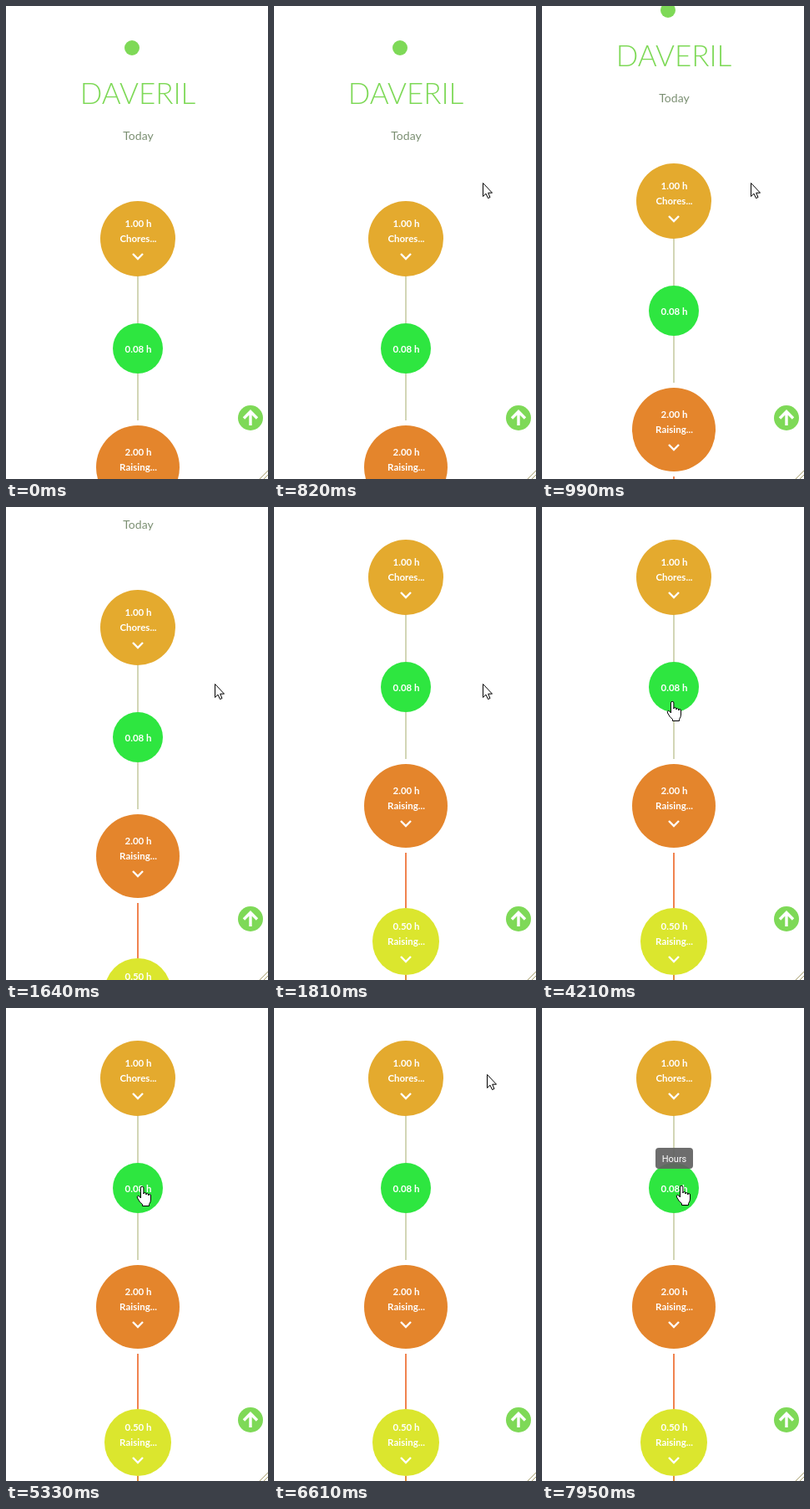
These frames come from a looping animation (314 by 565 pixels, 8 s). An HTML page:

```html
<!DOCTYPE html>
<html lang="en">
<head>
<meta charset="utf-8">
<title>Timeline</title>
<style>
  html, body { margin: 0; width: 100%; height: 100%; overflow: hidden; background: #fff; }
  svg { display: block; }
  text { font-family: Lato, sans-serif; text-anchor: middle; }
  .node text { font-size: 11.5px; font-weight: 700; fill: #fff; }
  .node path, #up path { fill: none; stroke: #fff; }
  .cursor { fill: #fff; stroke: #000; stroke-linejoin: round; }
</style>
</head>
<body>
<svg width="314" height="565" viewBox="0 0 314 565">
  <g id="page">
    <circle cx="151" cy="50" r="9" fill="#7ed957"/>
    <text x="158" y="117" font-size="35" font-weight="300" fill="#7ed957">DAVERIL</text>
    <text x="158.5" y="160" font-size="14" fill="#7b8f72">Today</text>
    <g id="links" stroke-width="2"></g>
    <g id="nodes"></g>
  </g>
  <g id="up">
    <circle cx="293" cy="492" r="15" fill="#7ed957"/>
    <path d="M293 501V485M285 492.5L293 484.5L301 492.5" stroke-width="3.4"/>
  </g>
  <path d="M304 565L314 555M309 565L314 560" stroke="#a8a070"/>
  <g id="tip">
    <rect x="136" y="167" width="45" height="25" rx="4" fill="#616161" opacity=".92"/>
    <text x="158.5" y="184" font-size="11" fill="#fff" style="font-family: Roboto, sans-serif">Hours</text>
  </g>
  <path id="arrow" class="cursor" d="M.5 .5V16.5L4 13.2L6.5 18.6L9 17.5L6.7 12.2H11.5Z"/>
  <path id="hand" class="cursor" d="M-1.5 2a1.7 1.7 0 0 1 3.4 0V9a1.5 1.5 0 0 1 3 0v1a1.4 1.4 0 0 1 2.8 0v1a1.4 1.4 0 0 1 2.8 0V16q0 3-2 5.5V23.5H.5V21.5Q-2.5 20-5.5 14Q-6.5 11.6-4.5 11.4Q-3 11.6-1.5 14Z"/>
</svg>
<script>
const LOOP = 8000;
const $ = id => document.getElementById(id);

// centre y, radius, colour, hours, label
const nodes = [
  [278, 45, '#e4aa2e', '1.00 h', 'Chores...'],
  [409, 30, '#2ee640', '0.08 h'],
  [551, 50, '#e4852c', '2.00 h', 'Raising...'],
  [713, 40, '#dbe62e', '0.50 h', 'Raising...']
];
// top, bottom, colour
const links = [
  [323, 379, '#d2d6b6'], [439, 495, '#d2d6b6'],
  [607, 673, '#f08350'], [753, 800, '#e0913f']
];

$('links').innerHTML = links.map(([a, b, c]) =>
  `<path d="M158 ${a}V${b}" stroke="${c}"/>`).join('');

$('nodes').innerHTML = nodes.map(([y, r, color, hours, label]) =>
  `<g class="node" transform="translate(158 ${y})"><circle r="${r}" fill="${color}"/>` +
  (label
    ? `<text x=".5" y="-14">${hours}</text><text x=".5" y="4">${label}</text>
       <path d="M-6 18L0 24L6 18" stroke-width="2.4"/>`
    : `<text x=".5" y="5">${hours}</text>`) + '</g>').join('');

// Pointer tip: time, x, y
const path = [
  [0, 285, 600], [110, 285, 600], [310, 250, 211], [2120, 250, 211],
  [2550, 156, 233], [4160, 156, 233], [4460, 156, 224], [4620, 156, 224],
  [4840, 163, 213], [5330, 163, 213], [5700, 314, -25], [6609, 314, -25],
  [6610, 255, 79], [7160, 167, 212], [LOOP, 167, 212]
];

function ease(t, from, to) {
  const p = Math.min(1, Math.max(0, (t - from) / (to - from)));
  return p * p * (3 - 2 * p);
}

function pointer(t) {
  const i = path.findIndex(k => k[0] > t);
  const [t0, x0, y0] = path[i - 1], [t1, x1, y1] = path[i];
  const p = ease(t, t0, t1);
  return [Math.round(x0 + (x1 - x0) * p), Math.round(y0 + (y1 - y0) * p)];
}

function draw(t) {
  const scroll = Math.round(133 * ease(t, 820, 1150) ** 1.7 + 61 * ease(t, 1625, 1810));
  $('page').setAttribute('transform', `translate(0 ${-scroll})`);

  const [x, y] = pointer(t);
  const over = Math.hypot(x - 158, y - 409 + scroll) < 30;
  for (const id of ['arrow', 'hand']) {
    $(id).setAttribute('transform', `translate(${x} ${y})`);
    $(id).style.display = over === (id === 'hand') ? '' : 'none';
  }
  $('tip').style.opacity = t < 7870 ? 0 : t < 7950 ? 0.6 : 1;
}

function frame() {
  draw(performance.now() % LOOP);
  requestAnimationFrame(frame);
}
frame();
</script>
</body>
</html>
```
